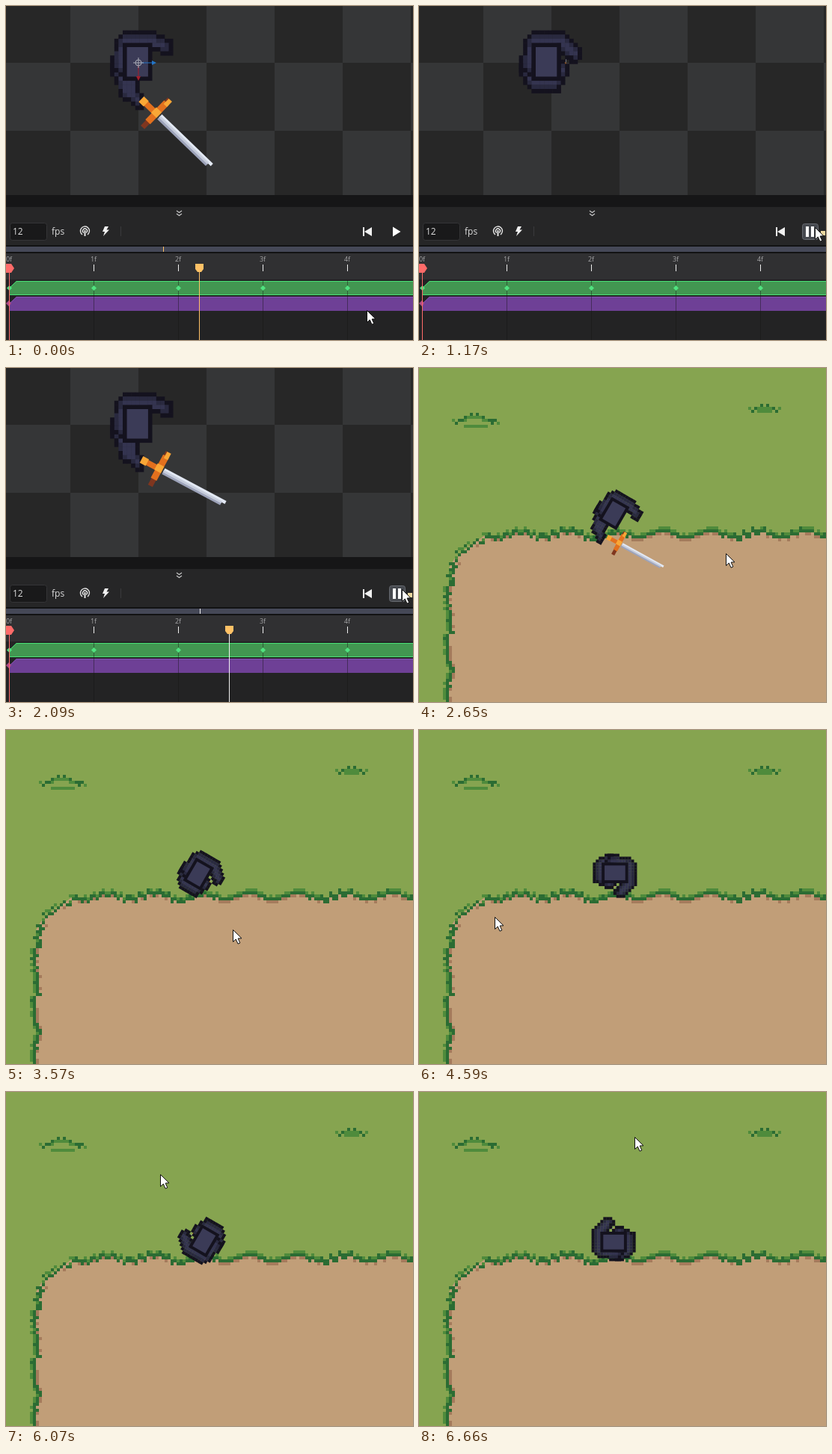
An HTML page with a canvas for the animation above (6710 ms loop, 544x447 px).

```html
<!DOCTYPE html>
<html lang="en">
<head>
<meta charset="utf-8">
<title>Sword swing</title>
<style>
html, body { margin: 0; width: 100%; height: 100%; overflow: hidden; background: #222; }
canvas { display: block; }
</style>
</head>
<body>
<canvas id="stage" width="544" height="447"></canvas>
<script>
const c = document.getElementById('stage').getContext('2d');
const LOOP = 6710, LAST = 6660, PLAY = 895, CUT = 2480;
const FRAME = 1000 / 12, FRAMES = 7;
const CELL = 5.6, ORIGIN = -43.4;
const INK = '#14121e', MID = '#29293f', CLOTH = '#343450', CORE = '#3b3b57';

const clamp = (v, a = 0, b = 1) => Math.min(b, Math.max(a, v));
const mix = (a, b, k) => a + (b - a) * k;
const mixAll = (a, b, k) => a.map((v, n) => mix(v, b[n], k));
const rad = d => d * Math.PI / 180;
const wave = v => Math.cos(v / 64 * 2 * Math.PI);
const noise = n => { const v = Math.sin(n * 127.1) * 43758.5; return v - Math.floor(v); };

// Key points are [time, ...values]
function at(keys, t) {
  let i = 0;
  while (i < keys.length - 2 && t >= keys[i + 1][0]) i++;
  const [a, b] = [keys[i], keys[i + 1]];
  return mixAll(a, b, clamp((t - a[0]) / (b[0] - a[0]))).slice(1);
}
function rect(color, x, y, w, h) { c.fillStyle = color; c.fillRect(x, y, w, h); }
function poly(color, pts, stroke) {
  c.beginPath();
  pts.forEach(p => c.lineTo(...p));
  c.closePath();
  c.fillStyle = color; c.fill();
  if (stroke) { c.strokeStyle = stroke; c.lineWidth = 1; c.stroke(); }
}
function line(color, pts, width = 1) {
  c.beginPath();
  pts.forEach(p => c.lineTo(...p));
  c.strokeStyle = color; c.lineWidth = width; c.stroke();
}

// ---- character -------------------------------------------------------
// Limbs are chains of [x, y, radius]; only the far end bends
const UPPER = [[-29, 2, 14], [-20, -26, 16.5], [10, -30, 13.5]];
const LOWER = [[-29, 12, 14], [-18, 23, 17]];
// guard x, guard y, angle, size over the frames of a swing
const SWING = [
  [0, -4, 22, 150, .05], [1, -37, -3, 129, .74], [2.25, 24, 68, 44, 1],
  [4, 45, 25, -35, .9], [5, 19, 0, -80, .05]
];

function depth(x, y, pts) {
  let best = 99;
  for (let i = 1; i < pts.length; i++) {
    const [ax, ay, ar] = pts[i - 1], [bx, by, br] = pts[i];
    const dx = bx - ax, dy = by - ay;
    const k = clamp(((x - ax) * dx + (y - ay) * dy) / (dx * dx + dy * dy));
    best = Math.min(best, Math.hypot(x - ax - dx * k, y - ay - dy * k) - mix(ar, br, k));
  }
  return best;
}
function cell(color, i, j, w = 1, h = 1) {
  rect(color, ORIGIN + i * CELL, ORIGIN + j * CELL, w * CELL + .3, h * CELL + .3);
}
function limb(pts) {
  for (let j = 0; j < 20; j++) for (let i = -1; i < 18; i++) {
    const d = depth(ORIGIN + (i + .5) * CELL, ORIGIN + (j + .5) * CELL, pts);
    if (d < 0) cell(d > -5 ? INK : d > -8.5 ? MID : CLOTH, i, j);
  }
}
function sword(x, y, angle, size) {
  c.save();
  c.translate(x, y); c.rotate(rad(angle)); c.scale(size, size);
  rect('#e3e9f4', 6, -4.5, 95, 4.5);
  rect('#9da3ba', 6, 0, 90, 4.5);
  rect('#c7cddc', 6, -1.5, 90, 3);
  rect('#e2701e', -20, -4, 20, 8);
  rect('#f9a736', -28, -5, 9, 10);
  rect('#7f361f', -4, -26, 7, 52);
  rect('#e2701e', -5, -20, 9, 36);
  rect('#f9a736', -2, -26, 6, 10);
  rect('#f9a736', -6, -6, 10, 10);
  c.restore();
}
function fighter(x, y, size, turn, phase) {
  const reach = clamp(Math.min(phase * 1.1, 5 - phase));
  const drop = clamp(Math.min(phase - 1, 5 - phase));
  const lean = ([px, py, r]) => [px + 5 * reach, py, r];
  c.save();
  c.translate(x, y); c.rotate(rad(turn)); c.scale(size, size);
  limb([...LOWER.map(lean), mixAll([2, 26, 14.5], [-14, 36, 14.5], drop), mixAll([14, 8, 11.5], [0, 53, 9], drop)]);
  limb([...UPPER.map(lean), mixAll([31, -12, 11.5], [38, -21, 10.5], reach)]);
  const col = reach > .5 ? 4 : 3;
  cell(INK, col, 3, 7, 9);
  cell(CORE, col + 1, 4, 5, 7);
  sword(...at(SWING, phase));
  c.restore();
}
function cursor(x, y) {
  const pts = [[0, 0], [0, 16], [3.8, 12.5], [6.5, 18.7], [9.3, 17.5], [6.6, 11.5], [11.5, 11.3]];
  poly('#fff', pts.map(p => [Math.round(x) + .5 + p[0], Math.round(y) + .5 + p[1]]), '#111');
}

// ---- editor ----------------------------------------------------------
function text(s, x, y, size, color) {
  c.font = size + 'px "Open Sans", "Noto Sans", sans-serif';
  c.fillStyle = color; c.fillText(s, x, y);
}
function box(x, y, w, h, fill, stroke) {
  c.beginPath(); c.roundRect(x + .5, y + .5, w, h, 3);
  c.fillStyle = fill; c.fill();
  c.strokeStyle = stroke; c.lineWidth = 1; c.stroke();
}
function toolbar(playing, hover) {
  rect('#161617', 0, 253, 544, 16);
  rect('#262627', 0, 269, 544, 52);
  for (const y of [274, 278]) line('#c8c8c8', [[228, y], [231.5, y + 2.5], [235, y]], 1.2);
  box(5, 290, 49, 23, '#19191a', '#353537');
  text('12', 9, 306, 12, '#ddd');
  text('fps', 61, 306, 12, '#ddd');
  c.strokeStyle = '#e4e4e4'; c.lineWidth = 1.4;
  for (const r of [6, 3]) { c.beginPath(); c.arc(105.5, 301, r, rad(125), rad(415)); c.stroke(); }
  rect('#e4e4e4', 104.5, 300, 2, 8);
  poly('#f2f2f2', [[132, 295], [137, 295], [134.5, 299.5], [138, 299.5], [130, 308], [132, 302], [129, 302]]);
  rect('#3a3a3c', 153, 295, 1, 13);
  rect('#f0f0f0', 477, 296, 2, 12);
  poly('#f0f0f0', [[489, 296], [489, 308], [479, 302]]);
  if (hover) box(512, 291, 21, 21, playing ? '#46494f' : '#38393c', '#66696f');
  if (playing) {
    for (const x of [517, 524]) rect('#fff', x, 295, 4, 14);
    rect('#ecd9a0', 537, 301, 6, 6);
  } else poly('#fff', [[517, 295.5], [517, 308.5], [527.5, 302]]);
}
function track(y, fill, edge) {
  poly(fill, [[4, y + 10], [14, y], [544, y], [544, y + 19], [4, y + 19]]);
  line(edge, [[4, y + 10], [14, y + .5], [544, y + .5]]);
}
function timeline(frame, playing) {
  const x0 = 4, step = 113, head = Math.round(x0 + frame * step);
  const color = playing ? '#f1f1f1' : '#ffc166';
  rect('#121213', 0, 320, 544, 11);
  rect('#454857', 0, 322, 544, 7);
  rect('#303032', 0, 331, 544, 36);
  rect('#232324', 0, 366, 544, 81);
  track(368, '#429651', '#48e276');
  rect('#48e276', 4, 386, 540, 1);
  track(389, '#6e4096', '#8752b4');
  c.textAlign = 'center';
  for (let i = 0; i < 5; i++) {
    const x = x0 + i * step;
    text(i + 'f', x, 342, 9, '#a5a5a7');
    rect('#eee', x, 346, 1, 9);
    if (i) rect('rgba(20,20,22,.45)', x, 367, 1, 80);
    poly('#50e380', [[x - 3, 377.5], [x + .5, 374], [x + 4, 377.5], [x + .5, 381]]);
  }
  c.textAlign = 'left';
  poly('#b04a86', [[0, 398], [4, 394], [7, 398], [4, 402]]);
  rect('#ff6b69', 4, 350, 1, 97);
  poly('#ff6b69', [[0, 345], [7, 345], [11, 351], [7, 357], [0, 357]]);
  rect(color, playing ? Math.round(frame * 99.5) : 210, 322, 1, 7);
  rect(color, head, 350, 1, 97);
  poly('#ffc166', [[head - 5, 345], [head + 6, 345], [head + 6, 352], [head + 3, 356], [head - 2, 356], [head - 5, 352]]);
}
function gizmo(x, y) {
  for (const [color, angle] of [['#a41e2c', 90], ['#2375c8', 0]]) {
    c.save();
    c.translate(x, y); c.rotate(rad(angle));
    line(color, [[4, 0], [20, 0]]);
    poly(color, [[18, -3], [24, 0], [18, 3]]);
    c.restore();
  }
  c.beginPath(); c.arc(x, y, 4, 0, 7);
  c.strokeStyle = '#a9abb5'; c.stroke();
  line('#a9abb5', [[x - 7, y], [x + 7, y]]);
  line('#a9abb5', [[x, y - 7], [x, y + 7]]);
}
function editor(t) {
  const playing = t >= PLAY;
  const frame = (2.25 + Math.max(0, t - PLAY) / FRAME) % FRAMES;
  for (let j = 0; j < 3; j++) for (let i = 0; i < 7; i++)
    rect((i + j) % 2 ? '#353637' : '#272727', i * 91 - 5, j * 91 - 15, 91, 91);
  fighter(177, 76, 1, 0, frame);
  if (!playing) gizmo(177, 76);
  toolbar(playing, t > 400);
  timeline(frame, playing);
  const k = clamp((t - 50) / 430), e = k * k * (3 - 2 * k);
  cursor(mix(482, 529, e), mix(407, 296, e));
}

// ---- field -----------------------------------------------------------
const LEAF = '#2b6c33', MOSS = '#4f8b3c', SOIL = '#a57b5c', DIRT = '#c19e78', GRASS = '#86a450';
const CENTER = [261, 196], SWING_GAP = 750, SWING_AT = 5380, LAG = 300;
const POINTER = [
  [2480, 430, 245], [3570, 303, 267], [4280, 248, 309], [4590, 101, 250],
  [5000, 54, 210], [5460, 55, 203], [6400, 288, 60]
];
const snap = v => Math.round(v / 4) * 4;
const px = (color, x, y) => rect(color, snap(x), snap(y), 4, 4);

// One step of the border; (ox, oy) points out into the grass
function edge(x, y, ox, oy) {
  const n = noise(x + y * 3);
  if (n > .35) px(n > .8 ? LEAF : MOSS, x + ox, y + oy);
  px(n < .12 ? MOSS : LEAF, x, y);
  if (n < .6) px(n < .25 ? LEAF : SOIL, x - ox, y - oy);
}
function tuft(x, y, w, h) {
  for (let i = 0; i <= w; i += 4) {
    const k = Math.abs(i / w * 2 - 1), top = y - h * clamp(1.25 - k * 1.6);
    px(k > .9 ? MOSS : LEAF, x + i, top + i % 8 / 2);
    if (k < .8) px(k > .5 ? LEAF : MOSS, x + i, k > .5 ? y : top + 4 - i % 8 / 2);
    if (k < .6) px(MOSS, x + i, y + h - 1);
  }
}
function ground() {
  rect(GRASS, 0, 0, 544, 447);
  poly(DIRT, [[40, 447], [40, 268], [48, 254], [64, 241], [88, 224], [544, 224], [544, 447]]);
  for (let x = 88; x < 544; x += 4) {
    const y = 220 - 4 * Math.round(wave(x - 132) * .9);
    rect(DIRT, x, y + 4, 4, 8);
    edge(x, y, 0, -4);
  }
  for (let k = 0; k < 1; k += 1 / 12) {
    const u = 1 - k;
    edge(u * u * 88 + 2 * u * k * 56 + k * k * 40, u * u * 224 + 2 * u * k * 238 + k * k * 268, -3, -4);
  }
  for (let y = 268; y < 447; y += 4) edge(wave(y - 340) > .3 ? 40 : 36, y, -4, 0);
  tuft(42, 69, 60, 8);
  tuft(438, 53, 40, 5);
}
function field(t) {
  ground();
  // The body follows the pointer late, in steps of 30 degrees
  const [px, py] = at(POINTER, t - LAG);
  const turn = Math.round(Math.atan2(py - CENTER[1], px - CENTER[0]) * 6 / Math.PI) * 30;
  const phase = (t - SWING_AT + SWING_GAP * 4) % SWING_GAP / FRAME;
  fighter(...CENTER, .7, turn, phase);
  cursor(...at(POINTER, t));
}

const began = performance.now();
function draw() {
  const t = Math.min((performance.now() - began) % LOOP, LAST);
  (t < CUT ? editor : field)(t);
  requestAnimationFrame(draw);
}
draw();
</script>
</body>
</html>
```
